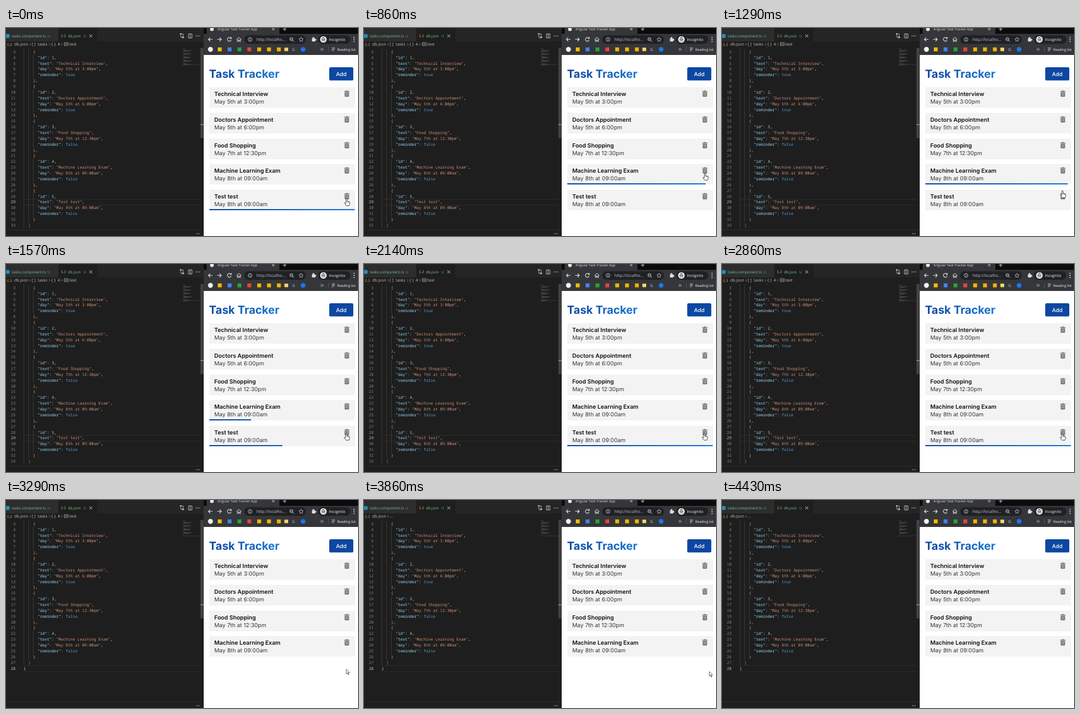
Recreate the animation shown at these times as an HTML page. Size 600 by 355 pixels, loop 4850 ms.

```html
<!DOCTYPE html>
<html lang="en">
<head>
<meta charset="utf-8">
<title>Task Tracker</title>
<style>
  html, body { margin: 0; width: 100%; height: 100%; overflow: hidden; background: #fff; }
  svg { display: block; width: 600px; height: 355px; }
  text { white-space: pre; text-rendering: geometricPrecision; font-family: "Open Sans", sans-serif; }
  .code text { font: 500 6.65px "Noto Sans Mono", monospace; }
  .page text { font-family: Inter, sans-serif; }
</style>
</head>
<body>
<svg id="stage" viewBox="0 0 600 355" xmlns="http://www.w3.org/2000/svg"></svg>
<script>
const LOOP = 4850, CARD_GONE = 3000, CODE_SAVED = 3140, CRUMB_CHANGED = 3430;
const LINE = 9.87, COL = 3.99, PITCH = 43.8;
const tasks = [
  ["Technical Interview", "May 5th at 3:00pm", true],
  ["Doctors Appointment", "May 5th at 6:00pm", true],
  ["Food Shopping", "May 7th at 12:30pm", false],
  ["Machine Learning Exam", "May 8th at 09:00am", false],
  ["Test test", "May 8th at 09:00am", false]
];

const rect = (x, y, w, h, fill, more = "") =>
  `<rect x="${x}" y="${y}" width="${w}" height="${h}" fill="${fill}" ${more}/>`;
const circle = (x, y, r, fill, more = "") =>
  `<circle cx="${x}" cy="${y}" r="${r}" fill="${fill}" ${more}/>`;
const stroke = (d, color, width = 0.9, more = "") =>
  `<path d="${d}" fill="none" stroke="${color}" stroke-width="${width}" ${more}/>`;
const text = (x, y, size, fill, body, more = "") =>
  `<text x="${x}" y="${y}" font-size="${size}" fill="${fill}" ${more}>${body}</text>`;
const group = (id, body, more = "") => `<g id="${id}" ${more}>${body}</g>`;
const span = (color, body) => `<tspan fill="${color}">${body}</tspan>`;
const baseline = n => 42.8 + (n - 3) * LINE;

// Each code line is [column, coloured body, plain length].
function codeLines(list) {
  const plain = body => span("#d4d4d4", body);
  const lines = [
    [0, plain("{"), 1],
    [2, span("#9cdcfe", '"tasks"') + plain(": ") + span("#4f9bd8", "["), 10]
  ];
  const field = (key, value, color, comma = ",") => lines.push([6,
    span("#9cdcfe", `"${key}"`) + plain(": ") + span(color, value) + plain(comma),
    key.length + 5 + `${value}`.length]);
  list.forEach(([name, day, reminder], i) => {
    lines.push([4, span("#d7ba7d", "{"), 1]);
    field("id", i + 1, "#b5cea8");
    field("text", `"${name}"`, "#ce9178");
    field("day", `"${day}"`, "#ce9178");
    field("reminder", reminder, "#569cd6", "");
    lines.push([4, span("#d7ba7d", "}") + (i < list.length - 1 ? plain(",") : ""), 2]);
  });
  lines.push([2, span("#4f9bd8", "]"), 1], [0, plain("}"), 1]);
  return lines;
}

function editor(list, current, mark) {
  const lines = codeLines(list), last = lines.length;
  const guide = (col, from, to) =>
    rect(Math.round(30 + col * COL), baseline(from) - 7.2, 1, (to - from + 1) * LINE, "#383838");
  let body = rect(30, baseline(current) - 7.4, 301, 0.8, "#303030") +
    rect(30, baseline(current) + 2.4, 301, 0.8, "#303030") +
    guide(0, 2, last - 1) + guide(2, 3, last - 2);
  list.forEach((_, i) => body += guide(4, 4 + i * 6, 7 + i * 6));
  lines.forEach(([col, line, length], i) => {
    const n = i + 1, y = baseline(n);
    if (n > 1) body += text(30 + col * COL, y, 6.65, "#d4d4d4", line);
    if (n > 2) body += text(16.3, y, 6.65, n === current ? "#c6c6c6" : "#858585", n, 'text-anchor="end"');
    const color = length > 20 ? "#65503f" : "#3f525c";
    body += rect(300 + col * 0.4, 34 + i * 0.96, length * 0.45, 0.6, color);
  });
  return body + rect(300, 34 + current * 0.96, 31, 0.6, "#34495a") +
    rect(331.5, 34, 5, mark - 10, "#424242") + rect(331.5, mark, 5, 1.5, "#929292");
}

const braces = (x, y) => text(x, y, 6.2, "#d9a441", "{..}", 'font-weight="600"');
const crumb = (x, body) => text(x, 30.1, 6.9, "#c0c0c0", body);
const chevron = x => stroke(`M${x} 25.8l2 2-2 2`, "#aaa", 0.7);

function editorFrame() {
  const green = "#73c991";
  return rect(0, 0, 337, 23, "#252526") + rect(0, 0, 89, 23, "#2d2d2d") + rect(89.5, 0, 66, 23, "#1e1e1e") +
    circle(3, 13.5, 3.6, "#1f8fb5") +
    text(10, 15.6, 6.4, green, "tasks.component.ts") + text(71, 15.6, 6.2, "#5f9f78", "U") +
    braces(94, 15.4) + text(105.5, 15.6, 6.4, green, "db.json") + text(132, 15.6, 6.2, "#5f9f78", "U") +
    stroke("M142 11l5 5m0-5l-5 5", "#ddd") +
    stroke("M298 10v6h4m-2-2 2 2-2 2M302 16v-6h-4", "#c5c5c5", 0.8) +
    circle(297.6, 10, 1.2, "#c5c5c5") + circle(302.4, 16, 1.2, "#c5c5c5") +
    stroke("M311 10h6v7h-6zM314 10v7", "#c5c5c5") +
    [324, 327, 330].map(x => circle(x, 13.5, 0.8, "#c5c5c5")).join("") +
    braces(2, 29.8) + crumb(14, "db.json") +
    group("path", chevron(40) +
      crumb(44, "[ ]") + crumb(54, "tasks") + chevron(73.5) + crumb(77.5, "{ }") + crumb(88, "4") + chevron(94) +
      rect(99.5, 25, 6.5, 5, "none", 'stroke="#bbb" stroke-width=".7"') +
      stroke("M101 27.5h3.5", "#bbb", 1) + crumb(108, "text")) +
    group("more", chevron(40) + crumb(44, "..."));
}

function browser() {
  const light = "#dadce0";
  const ring = (x, y, r, color, width) => circle(x, y, r, "none", `stroke="${color}" stroke-width="${width}"`);
  const bookmarks = ["#fbbc04", "#4285f4", "#20a83a", "#ea4335", "#f4b400", "#f4b400", "#f4b400"];
  return rect(337, 0, 263, 46, "#35363a") + rect(337, 0, 263, 10, "#0c0c0d") +
    rect(342, -4, 124, 15, "#35363a", 'rx="3"') +
    circle(351, 2, 3.2, "#e4e4e4") + text(360.5, 4.4, 5.8, light, "Angular Task Tracker App") +
    stroke("M453.5 0l4 4m0-4l-4 4M472 2h6m-3-3v6", light) +
    stroke("M352 19.5h-7m3-3-3 3 3 3", light, 1.1) + stroke("M360 19.5h7m-3-3 3 3-3 3", light, 1.1) +
    stroke("M383.5 17.5a3.3 3.3 0 1 0 .3 3M384 15.5v2.5h-2.6", light, 1.1) +
    stroke("M393 19.5l4-3.5 4 3.5M394.3 19v4h1.8v-2.500h1.8v2.500h1.800v-4", light, 1) +
    rect(406, 12.5, 105, 14.5, "#202124", 'rx="7.2"') +
    ring(416, 19.5, 3.2, light, 0.8) + stroke("M416 19v2.3M416 17.4v.8", light) +
    text(427, 22, 6.95, "#c5c7ca", "http://localho...") +
    ring(486.5, 19, 2.6, light, 0.9) + stroke("M488.5 21l2.5 2.5M485.3 19h2.4", light) +
    stroke("M503 15.8l1.1 2.4 2.6.3-1.9 1.8.5 2.6-2.3-1.3-2.3 1.3.5-2.6-1.9-1.8 2.6-.3z", light, 0.7) +
    rect(521.5, 17.5, 5.5, 5.5, light) + circle(524, 17, 1.4, light) + circle(527.5, 20.2, 1.4, light) +
    rect(532, 12.5, 55, 14.5, "#202124", 'rx="7.2"') +
    circle(541, 19.5, 5.6, "#f1f3f4") +
    stroke("M537.5 19h7M539.5 17.7l.5-1.7h2l.5 1.7", "#35363a", 1) +
    ring(539.4, 21.4, 1.2, "#35363a", 0.7) + ring(542.6, 21.4, 1.2, "#35363a", 0.7) +
    text(550.5, 21.8, 6.4, "#fff", "Incognito") +
    [16, 19.5, 23].map(y => circle(593.3, y, 0.9, light)).join("") +
    circle(348.5, 36.5, 4.2, "#f1f3f4") +
    bookmarks.map((color, i) => rect(361 + i * 16.8, 33.2, 6.6, 6.6, color)).join("") +
    rect(474.5, 33.5, 6.5, 6, "#f6d56a", 'rx=".7"') + text(488, 38.8, 6.2, light, "G") +
    circle(506.5, 36.5, 4, "#1877f2") +
    stroke("M536.5 34.5l2 2-2 2m2.6-4 2 2-2 2", light) + rect(549, 32, 0.7, 9, "#5f6368") +
    stroke("M555.5 34h5m-5 2.3h5m-5 2.3h3", light) + text(564.5, 38.6, 5.9, "#f1f3f4", "Reading list");
}

const trash = y => `<g transform="translate(576.5 ${y})">` +
  rect(0, 1, 9, 1.2, "#666") + rect(3, 0, 3, 1.2, "#666") +
  `<path d="M.8 3h7.4v6.5q0 1-1 1h-5.4q-1 0-1-1z" fill="#666"/>` +
  stroke("M2.7 4.2v5M4.5 4.2v5M6.3 4.2v5", "#f4f4f4", 0.6) + "</g>";

const card = ([name, day], i) => {
  const y = Math.round(101 + i * PITCH);
  return group("card" + i, rect(346.5, y, 248.5, 35, "#f3f3f4") +
    text(355, y + 14.5, 9.75, "#111", name, 'font-weight="600"') +
    text(355, y + 28.3, 9.55, "#363636", day) + trash(y + 5.7) +
    rect(346.5, y + 33, 0, 2, "url(#blue)", `id="bar${i}"`));
};

const gradient = (id, x1, x2) =>
  `<linearGradient id="${id}" gradientUnits="userSpaceOnUse" x1="${x1}" x2="${x2}" y1="0" y2="0">` +
  `<stop stop-color="#0d47a1"/><stop offset="1" stop-color="#1976d2"/></linearGradient>`;

const stage = document.getElementById("stage");
stage.innerHTML = `<defs>${gradient("title", 346, 466)}${gradient("blue", 346, 595)}` +
  `<clipPath id="view">${rect(0, 33.5, 337, 310.5, "#000")}</clipPath></defs>` +
  rect(0, 0, 337, 355, "#1e1e1e") +
  `<g class="code" clip-path="url(#view)">` +
  group("before", editor(tasks, 29, 164)) + group("after", editor(tasks.slice(0, 4), 28, 178)) + "</g>" +
  editorFrame() + rect(0, 344.5, 337, 0.7, "#333") +
  [324.5, 327, 329.5].map(x => circle(x, 351, 0.7, "#c5c5c5")).join("") +
  rect(337, 46, 263, 309, "#fff") + browser() +
  `<g class="page">` + text(346, 84.7, 19.1, "url(#title)", "Task Tracker", 'font-weight="700"') +
  rect(551, 67, 41, 22.5, "#0d47a1", 'rx="2.6"') + text(562.5, 81.7, 9.3, "#fff", "Add", 'font-weight="500"') +
  tasks.map(card).join("") + "</g>" +
  group("cursor",
    group("hand", `<path d="M-1 1q0-1.300 1-1.300t1 1.300v3.600l3.600.8q1.200.4 1.100 1.600l-.6 3-.6 1.900h-5l-2.800-3.800q-.6-1.300.8-1.300l1.500 1z" fill="#fff" stroke="#222" stroke-width=".8"/>`.replace(/00(?=\D)/g, "") +
      stroke("M2.3 4.8v2M4 5.2v1.8", "#222", 0.5)) +
    group("arrow", `<path d="M0 0v8l1.8-1.7 1.3 3 1.3-.6-1.3-2.9h2.5z" fill="#fff" stroke="#222" stroke-width=".7"/>`));

const el = {};
stage.querySelectorAll("[id]").forEach(node => el[node.id] = node);
const show = (id, on) => el[id].style.display = on ? "" : "none";

function ramp(t, from, to) {
  const u = Math.min(1, Math.max(0, (t - from) / (to - from)));
  return u * u * (3 - 2 * u);
}

// Pointer tip as [time, x, y].
const pointer = [
  [0, 580.5, 291.3], [200, 580.5, 291.3], [430, 581.3, 247.8], [1100, 581.3, 247.8], [1290, 580.3, 277.8],
  [1500, 580, 288.8], [3570, 580, 288.8], [4250, 602, 299]
];
function pointerAt(t) {
  let [, x, y] = pointer[0];
  for (let i = 1; i < pointer.length; i++) {
    const k = ramp(t, pointer[i - 1][0], pointer[i][0]);
    x += (pointer[i][1] - pointer[i - 1][1]) * k;
    y += (pointer[i][2] - pointer[i - 1][2]) * k;
  }
  return [x, y];
}

function draw(now) {
  const t = now % LOOP;
  const fourth = ramp(t, 300, 947) * (1 - ramp(t, 1248, 1748));
  const fifth = t < 1290 ? 1 - ramp(t, 230, 700) : ramp(t, 1290, 1850);
  el.bar3.setAttribute("width", 248 * fourth);
  el.bar4.setAttribute("width", 248 * fifth);
  show("card4", t < CARD_GONE);
  show("hand", t < CARD_GONE);
  show("arrow", t >= CARD_GONE);
  show("before", t < CODE_SAVED);
  show("after", t >= CODE_SAVED);
  show("path", t < CRUMB_CHANGED);
  show("more", t >= CRUMB_CHANGED);
  el.cursor.setAttribute("transform", `translate(${pointerAt(t)})`);
  requestAnimationFrame(draw);
}
draw(performance.now());
</script>
</body>
</html>
```
